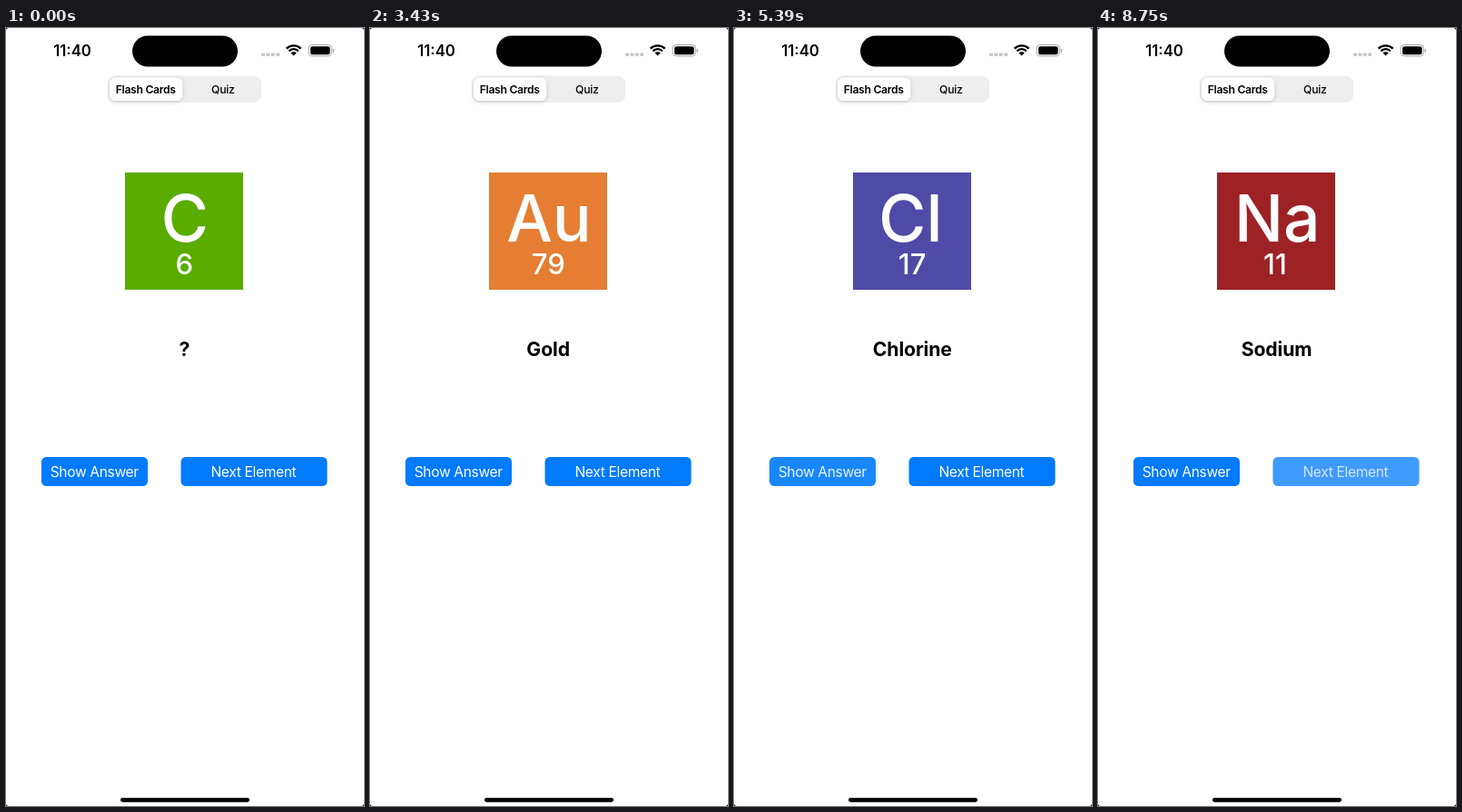
These frames come from a looping animation (394 px wide and 856 px high, 8.82 s). An HTML page with a canvas:

```html
<!DOCTYPE html>
<html lang="en">
<head>
<meta charset="utf-8">
<title>Element flash cards</title>
<style>
html, body { margin: 0; width: 100%; height: 100%; overflow: hidden; background: #fff; }
canvas { display: block; width: 394px; height: 856px; }
</style>
</head>
<body>
<canvas id="stage"></canvas>
<script>
const W = 394, H = 856, LOOP = 8820;
const FONT = 'Inter, "Liberation Sans", sans-serif';
const BLUE = '#007aff';

const canvas = document.getElementById('stage');
const ctx = canvas.getContext('2d');
const ratio = window.devicePixelRatio || 1;
canvas.width = W * ratio;
canvas.height = H * ratio;

// x and numX are the optical centres of the symbol and the number
const cards = [
  { symbol: 'C', number: '6', name: 'Carbon', color: '#5aac00', x: 196.5, numX: 196 },
  { symbol: 'Au', number: '79', name: 'Gold', color: '#e57e33', x: 195, numX: 196 },
  { symbol: 'Cl', number: '17', name: 'Chlorine', color: '#4f4aa5', x: 193.3, numX: 196.3 },
  { symbol: 'Na', number: '11', name: 'Sodium', color: '#9d2226', x: 197.5, numX: 194.5 }
];

// Taps alternate between "Show Answer" and "Next Element"
const taps = [
  { down: 1050, up: 1330, rest: 1330 },
  { down: 2450, up: 2520, rest: 2520 },
  { down: 3360, up: 3430, rest: 3430 },
  { down: 4480, up: 4550, rest: 4550 },
  { down: 5320, up: 5390, rest: 5460 },
  { down: 6440, up: 6510, rest: 6580 },
  { down: 7210, up: 7280, rest: 7350 },
  { down: 8750, up: 8820, rest: 8820 }
];

function box(x, y, w, h, r, fill) {
  ctx.beginPath();
  ctx.roundRect(x, y, w, h, r);
  ctx.fillStyle = fill;
  ctx.fill();
}

// Centres the visible ink of the text on x
function label(text, x, baseline, size, weight, fill = '#000', spacing = 0) {
  ctx.font = `${weight} ${size}px ${FONT}`;
  ctx.letterSpacing = `${spacing}px`;
  ctx.fillStyle = fill;
  const m = ctx.measureText(text);
  const left = m.actualBoundingBoxLeft, right = m.actualBoundingBoxRight;
  ctx.fillText(text, x - (right - left) / 2, baseline);
}

function wifi(x, y) {
  const a = Math.PI * 0.25;
  ctx.strokeStyle = '#000';
  ctx.lineWidth = 2.3;
  for (const r of [11.3, 7.4]) {
    ctx.beginPath();
    ctx.arc(x, y, r, -Math.PI / 2 - a, -Math.PI / 2 + a);
    ctx.stroke();
  }
  ctx.beginPath();
  ctx.moveTo(x, y);
  ctx.arc(x, y, 4.4, -Math.PI / 2 - a, -Math.PI / 2 + a);
  ctx.fillStyle = '#000';
  ctx.fill();
}

function battery() {
  ctx.beginPath();
  ctx.roundRect(333.2, 18.6, 25.2, 12.3, 4);
  ctx.strokeStyle = '#a3a3a3';
  ctx.lineWidth = 1;
  ctx.stroke();
  box(335, 20.3, 21.6, 8.9, 2.5, '#000');
  box(359.7, 22.8, 1.4, 4.2, [0, 1.4, 1.4, 0], '#a3a3a3');
}

function statusBar() {
  label('11:40', 73, 31, 16.8, 600);
  box(139, 8.5, 116, 34, 17, '#000');
  for (let i = 0; i < 4; i++) box(281 + i * 5.4, 27.5, 4, 3.6, 1, '#c6c6c8');
  wifi(316.6, 30.6);
  battery();
}

function tabs() {
  box(112, 52.5, 169, 29.5, 8.5, '#eeeeef');
  ctx.save();
  ctx.shadowColor = 'rgba(0,0,0,0.16)';
  ctx.shadowBlur = 5 * ratio;
  ctx.shadowOffsetY = 1.5 * ratio;
  box(114, 54.5, 80.3, 25.6, 6.5, '#fff');
  ctx.restore();
  label('Flash Cards', 154, 72, 12.2, 600, '#000', -0.3);
  label('Quiz', 239, 72, 12.2, 450, '#000', -0.3);
}

function tile(card) {
  box(131, 159, 130, 129, 0, card.color);
  label(card.symbol, card.x, 235, 71.5, 500, '#fff');
  label(card.number, card.numX, 271, 31, 500, '#fff');
}

function button(text, x, w, alpha) {
  ctx.globalAlpha = alpha;
  box(x, 472, w, 32, 5.5, BLUE);
  label(text, x + w / 2, 494, 15.6, 400, '#fff', -0.35);
  ctx.globalAlpha = 1;
}

function opacity(t, parity) {
  const tap = taps.find((p, i) => i % 2 === parity && t >= p.down && t < p.rest);
  if (!tap) return 1;
  return t < tap.up ? 0.75 : 0.9;
}

function draw(t) {
  const done = taps.filter(p => t >= p.up).length;
  const card = cards[Math.floor(done / 2)];

  ctx.setTransform(ratio, 0, 0, ratio, 0, 0);
  box(0, 0, W, H, 0, '#000');
  box(0, 0, W, H, 3, '#fff');
  statusBar();
  tabs();
  tile(card);
  label(done % 2 ? card.name : '?', 196, 361, 21.2, 700, '#000', -0.1);
  button('Show Answer', 39, 117, opacity(t, 0));
  button('Next Element', 192.5, 161, opacity(t, 1));
  box(126, 847, 142, 4.7, 2.35, '#000');
}

const start = performance.now();
function tick() {
  draw((performance.now() - start) % LOOP);
  requestAnimationFrame(tick);
}
tick();
</script>
</body>
</html>
```
